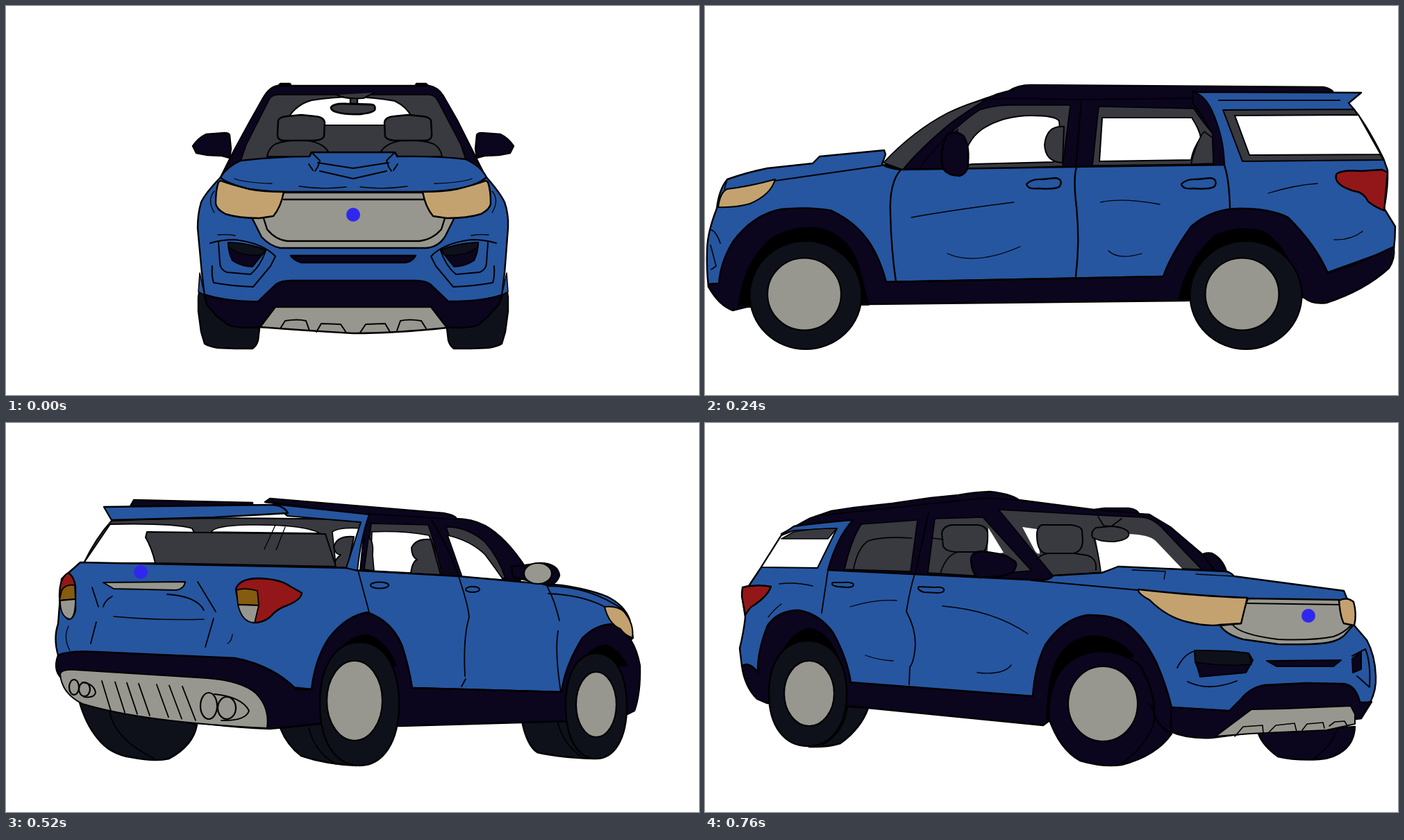
These frames come from a looping animation (998 px wide and 561 px high, 0.88 s). An HTML page with a canvas:

```html
<!DOCTYPE html>
<html lang="en">
<head>
<meta charset="utf-8">
<title>Turning car</title>
<style>
html, body { margin: 0; width: 100%; height: 100%; overflow: hidden; background: #fff; }
canvas { display: block; }
</style>
</head>
<body>
<canvas id="stage" width="998" height="561"></canvas>
<script>
const ctx = document.getElementById('stage').getContext('2d');
const BLUE = '#2656a0', DARK = '#0b051e', GLASS = '#393940', TYRE = '#0e1119',
  SILVER = '#98978f', TAN = '#c4a270', RED = '#931718', AMBER = '#855b10',
  BADGE = '#2f27ee', WHITE = '#fff', BLACK = '#000';

function paint(path, fill, width) {
  if (fill) { ctx.fillStyle = fill; ctx.fill(path); }
  if (width) { ctx.lineWidth = width; ctx.stroke(path); }
}
const shape = (fill, d, width = 2.4) => paint(new Path2D(d), fill, width);
const line = (d, width = 2.4) => shape(null, d, width);
const thin = d => line(d, 1.3);

function oval(fill, x, y, rx, ry, width = 2.2) {
  const path = new Path2D();
  path.ellipse(x, y, rx, ry, 0, 0, Math.PI * 2);
  paint(path, fill, width);
}
const badge = (x, y) => oval(BADGE, x, y, 10, 10, 0);

// An ellipse with slightly squared shoulders.
function tyre(x, y, rx, ry) {
  const k = 0.61, path = new Path2D();
  path.moveTo(x + rx, y);
  for (const [a, b] of [[1, 0], [0, 1], [-1, 0], [0, -1]]) {
    path.bezierCurveTo(x + rx * (a - b * k), y + ry * (b + a * k),
      x + rx * (a * k - b), y + ry * (b * k + a), x - rx * b, y + ry * a);
  }
  paint(path, TYRE, 2.4);
}

// Draws mirrored: x becomes sum - x.
function flip(sum, draw) {
  ctx.save();
  ctx.translate(sum, 0);
  ctx.scale(-1, 1);
  draw();
  ctx.restore();
}
function both(sum, draw) { draw(); flip(sum, draw); }

function front() {
  both(1000, () => {
    shape(TYRE, 'M280 400L277 420 277 440 281 470 286 487Q292 491 305 493L330 494 355 494Q361 490 363 482L365 465 330 440Z');
    shape(DARK, 'M322 186Q321 183 315 183L288 185Q277 190 269 202L274 212 290 215 311 216 322 219 324 206Z');
    shape(DARK, 'M390 117L395 112 409 112 412 117Z');
  });
  shape(DARK, 'M309 247L328 209 352 165 370 133Q380 116 392 115L609 115Q622 117 630 130L650 165 674 213 691 247Z');
  shape(GLASS, 'M338 223L346 200 378 137Q381 129 390 128L610 128Q618 129 622 137L655 200 662 221Z', 1.6);
  shape(WHITE, 'M406 162Q418 142 440 136Q500 126 560 137Q578 146 584 160L582 172 420 172Z', 2);
  both(1004, () => {
    shape(GLASS, 'M376 217Q378 205 388 199Q400 194 425 193Q455 195 464 210L466 218Z', 2);
    shape(GLASS, 'M392 165Q394 160 405 159L425 157 445 159Q458 160 459 168L458 188Q456 193 445 194L400 194Q390 194 391 183Z');
  });
  shape(GLASS, 'M476 128Q490 135 515 133L530 125', 2);
  shape(GLASS, 'M496 134V141H506V134');
  shape(GLASS, 'M468 146Q472 140 490 141L525 142Q533 142 531 150Q528 154 510 156Q490 157 476 153Q468 151 468 146Z', 2.8);
  shape(BLUE, 'M309 247Q318 232 338 223Q390 217 437 217L440 211 560 211 564 217Q620 216 662 221Q685 232 692 247Q712 270 718 283Q724 300 723 320L718 385 714 418Q670 428 637 427L363 427Q330 428 286 418L282 385 276 320Q276 300 281 283Q287 270 309 247Z');
  shape(BLUE, 'M279 385L277 412 286 417Z', 1.5);
  shape(BLUE, 'M721 385L723 412 714 417Z', 1.5);
  shape(DARK, 'M285 416Q320 427 363 426L388 402Q396 396 410 396L590 396Q604 396 612 402L637 426Q690 426 715 416L710 430 695 447 680 460Q665 466 634 463L366 463Q335 466 320 460L303 447 290 432Z');
  shape(SILVER, 'M388 434H612L635 464Q560 472 500 472Q430 468 366 463Z');
  shape(SILVER, 'M400 269L600 269 645 307 632 333Q622 348 605 349L395 349Q380 346 368 333L355 307Z');
  line('M400 279H603M371 306L376 322Q388 337 405 339L595 339Q614 337 627 322L632 306');
  badge(500, 301);
  shape(DARK, 'M410 360H590Q585 369 575 370L425 370Q414 366 410 360Z');
  line('M309 247Q315 255 350 264Q380 268 400 268H600Q670 267 692 247');
  line('M449 226L500 234 551 226M452 238L500 249 548 238', 2);
  both(1000, () => {
    line('M395 465L402 454Q420 451 432 454L437 468M447 470L454 458 482 459 490 471', 2);
    shape(TAN, 'M306 254Q302 265 302 285Q303 293 316 300Q335 306 365 306L385 303Q396 290 400 268Q370 268 350 264Q325 258 309 252Z');
    line('M437 217L440 211 452 223 449 232 445 238M436 228L442 237', 2);
    thin('M329 249Q345 255 383 256M422 260Q455 265 490 261M300 267Q289 280 300 298M305 330Q320 329 330 331');
    line('M294 342Q310 337 330 337Q370 342 388 361L381 375 356 405Q325 404 299 399Q296 390 297 375', 2);
    line('M306 341L308 370Q308 380 318 384L352 387Q366 376 374 353', 2);
    shape(DARK, 'M320 341Q320 355 326 367Q340 376 355 376L374 352Q350 342 320 341Z', 2);
    shape(TYRE, 'M320 341Q350 342 374 352L368 359Q340 362 321 348Z', 1.5);
  });
}

function frontCorner() {
  shape(DARK, 'M79 438Q80 460 95 472Q110 484 130 485Q165 487 190 481Q212 465 218 448Z');
  line('M104 440Q115 470 140 485', 1.6);
  shape(DARK, 'M264 214Q270 195 285 188Q295 186 303 192L296 212Z');
  shape(DARK, 'M280 214L298 190 345 150 375 132 390 131Q392 125 405 123L440 123 455 125 563 111Q575 102 605 99Q630 100 650 104L690 108 745 116 800 122 833 127 865 138 905 160Q880 170 840 215L525 227Z');
  line('M390 130L460 125 563 111L612 108 855 134', 1.6);
  shape(GLASS, 'M300 211L325 185 358 150Q372 137 385 136L430 134 592 125 514 220 440 215 420 207Z', 1.6);
  shape(WHITE, 'M328 210L366 170Q375 161 405 160L440 150 455 155Q447 190 445 215L420 207Z', 0);
  shape(WHITE, 'M537 153L558 150 540 184Q536 190 533 188Z', 0);
  line('M455 165Q448 190 445 214', 1.6);
  line('M452 212Q450 192 470 190L490 187M507 188Q530 186 537 197', 1.8);
  shape(GLASS, 'M472 155Q474 148 490 147L530 147Q538 150 537 165Q536 185 525 188L485 188Q472 186 471 170Z', 2);
  shape(GLASS, 'M415 138L430 149 441 148 449 135', 1.6);
  shape(GLASS, 'M405 158Q410 150 430 149L452 151Q460 156 457 165Q445 172 425 171Q402 168 405 158Z', 2);
  shape(GLASS, 'M545 213L615 136 684 138 694 216 630 220Z', 1.6);
  shape(WHITE, 'M585 187L607 151 608 186 600 189Z', 0);
  shape(GLASS, 'M608 158Q609 149 622 147L660 147Q673 149 674 160L672 178Q668 185 655 186L615 186Q607 182 608 158Z', 2);
  line('M650 186Q668 190 676 217M672 168L688 166M693 130L712 217', 1.6);
  shape(GLASS, 'M709 140L790 146Q805 170 814 211L719 214Z', 1.6);
  line('M717 166Q760 163 780 170Q795 180 801 210', 1.6);
  shape(BLUE, 'M95 242L253 221Q258 215 265 214L420 207 443 216 513 220Q518 226 530 227L838 212Q825 165 802 140Q835 142 887 149L905 162 934 208 952 235Q962 236 962 245L957 280Q959 300 965 325L962 350Q950 380 926 402L800 395 545 394 400 420 343 410 255 416 57 403Q48 385 49 365Q50 335 62 313L80 292Q82 265 91 252Z');
  shape(WHITE, 'M825 152L887 155 905 162 934 208 853 209Z', 2);
  shape(GLASS, 'M825 152Q860 152 887 157L905 167 838 167Z', 1.6);
  shape(DARK, 'M55 402Q68 404 72 402Q78 378 95 376L150 375 210 378Q230 382 243 398L260 415 343 410 380 404 345 445Q320 456 285 454L70 426Z');
  shape(DARK, 'M343 410Q350 380 365 345Q385 305 410 288Q430 276 465 277Q500 283 525 320Q540 350 543 394L805 374Q810 340 830 303Q850 275 880 270Q910 270 925 292Q940 330 939 360Q945 350 955 348L962 350Q958 380 940 398L926 404 800 409 528 436 520 430 345 448Z');
  shape(BLACK, 'M398 335Q420 308 455 307Q490 308 508 340Q522 365 523 428L500 430Z', 1);
  shape(DARK, 'M368 410Q372 375 390 348Q420 326 455 330Q490 335 508 365Q522 395 520 425Q505 470 475 487Q440 497 415 493Q365 480 343 448Q360 440 368 422Z');
  line('M376 405Q366 412 368 430Q378 465 415 491', 1.8);
  oval(SILVER, 442, 405, 50, 54);
  shape(BLACK, 'M820 345Q835 300 865 296Q895 300 912 350Z', 1);
  shape(TYRE, 'M780 411Q790 440 820 462Q840 468 865 467L880 440 820 408Z');
  tyre(867, 390, 56, 76);
  oval(SILVER, 865, 390, 36, 47);
  line('M810 408Q812 445 848 466', 1.6);
  shape(SILVER, 'M79 420L85 408 180 412 228 413 280 452 230 448 120 443 79 434Z', 2);
  line('M90 437L94 430 108 431 116 437M123 440L125 432 148 434 155 443M163 445L166 433 193 436 204 447M211 448L212 436 240 438 252 452', 1.6);
  shape(SILVER, 'M102 255L233 253Q240 270 243 289L273 292Q265 305 240 312L190 319Q140 320 120 317Q105 315 95 307L82 292 95 288Z');
  line('M102 262L235 260M85 292Q95 303 110 308Q140 314 190 312Q245 305 255 291', 2);
  badge(146, 278);
  shape(TAN, 'M234 252Q300 250 391 240Q392 246 375 255Q350 280 320 287Q290 294 273 291L243 289Z');
  shape(TAN, 'M81 258Q90 250 102 256Q100 280 95 289L80 292Q76 275 81 258Z');
  line('M391 241L545 227', 1.8);
  shape(DARK, 'M99 342L206 343 192 351 110 351Z', 2);
  line('M83 336L64 326Q56 345 58 381L76 365', 2);
  shape(DARK, 'M70 330L83 340 82 360 70 355Z', 2);
  shape(DARK, 'M226 342L232 332 260 329 310 328 309 345Q306 350 302 366L236 360Z', 2);
  shape(TYRE, 'M228 348L232 332 260 329 310 328 308 345Q280 350 245 349Z', 1.4);
  line('M310 329Q325 333 335 353M249 372Q290 388 320 373', 1.8);
  shape(RED, 'M920 236Q940 232 961 237L962 250 957 277Q950 265 945 263Q925 250 920 236Z');
  shape(DARK, 'M568 200Q565 205 570 213Q575 220 600 222L620 223Q632 218 632 195Q630 186 618 185Q590 188 580 192Z');
  line('M713 218Q720 240 725 272Q712 295 712 320Q714 345 720 352L721 377M838 213L847 274', 1.8);
  line('M671 240Q672 236 685 237L707 236Q711 240 700 244L680 245Q670 245 671 240ZM801 233Q803 229 815 230L831 230Q835 234 824 236L810 237Q801 237 801 233Z', 2);
  thin('M550 304Q600 270 673 264M574 349Q585 364 623 360M739 256Q770 254 806 265M744 343Q765 342 784 335M860 235Q885 229 908 232M905 261Q916 269 924 280M253 221L308 218M352 215L354 225M352 214L400 212');
}

function sideWheel(x, hubX) {
  oval(TYRE, x, 417, 80.5, 78);
  oval(SILVER, hubX, 415.5, 53, 52);
}

function side() {
  shape(DARK, 'M258 230L330 172Q370 145 405 133L437 123Q450 114 470 114L890 117Q905 120 905 126L735 126 748 229 280 236Z');
  line('M400 137Q420 124 445 121M406 134Q440 132 540 135L702 133', 1.6);
  shape(GLASS, 'M257 226Q300 180 350 154Q385 138 406 134Q380 150 355 168Q310 205 285 236Z', 1.8);
  shape(GLASS, 'M309 234Q350 180 395 150Q420 142 445 143L526 143 515 231 390 236Z', 1.6);
  shape(WHITE, 'M372 230Q374 195 400 177Q430 158 470 158Q505 158 510 166Q512 180 505 190L502 225 385 228Z', 1.8);
  shape(DARK, 'M309 234Q335 200 365 176L358 235Z', 0);
  shape(GLASS, 'M517 174Q492 172 489 200Q490 225 515 226Z', 2);
  shape(GLASS, 'M567 145L704 148Q715 165 732 185L731 228 558 230Z', 1.6);
  shape(WHITE, 'M572 161L701 161Q712 178 714 190Q703 205 700 222L568 224Z', 2);
  shape(GLASS, 'M719 181Q709 192 700 228L732 227 731 190Z', 1.6);
  line('M542 135L534 232', 1.8);
  shape(BLUE, 'M32 250Q60 240 90 234L155 227 165 217 258 208 260 214 255 228Q262 234 282 236L530 232 748 229Q740 170 702 124L945 125 927 140Q950 165 977 220L983 237Q984 260 978 292L994 318Q994 335 992 350L895 385 660 390 261 398 20 410 5 405Q2 380 3 350Q4 325 17 292Q20 265 32 250Z');
  shape(DARK, 'M702 124Q718 126 730 150Q748 190 748 229L732 229 731 185Q715 155 702 140Z', 1.5);
  shape(GLASS, 'M746 150L935 149 977 222 774 224Z', 2);
  shape(WHITE, 'M763 158L941 157 973 214 784 215Z', 2);
  line('M740 136H914', 2);
  shape(DARK, 'M5 401L20 400Q22 370 40 340Q70 300 110 293Q150 289 182 295Q225 315 245 355Q255 375 261 398L660 390Q670 360 700 318Q730 292 770 292Q815 292 840 305Q880 345 897 385Q950 368 992 347Q994 365 985 378Q950 410 895 428Q875 431 862 420L690 425 237 430 60 434 40 439Q20 432 5 405Z');
  shape(BLACK, 'M48 432Q55 370 95 335Q130 315 165 320Q205 330 220 370L236 431Z', 1);
  shape(BLACK, 'M682 424Q690 370 735 330Q770 315 805 325Q840 345 862 420Z', 1);
  sideWheel(145, 143);
  sideWheel(779, 773.5);
  line('M101 252Q200 238 255 230', 1.8);
  shape(TAN, 'M32 264Q65 260 101 250Q95 272 65 285Q45 291 19 290Q22 268 32 264Z', 2);
  line('M32 250L28 264M9 323Q16 325 22 342M8 345Q12 360 16 375L9 380', 1.6);
  shape(DARK, 'M348 186Q360 178 372 187Q381 200 379 225Q380 240 367 245Q350 245 343 235Q337 210 348 186Z');
  line('M282 236Q265 255 267 300Q268 350 275 398M535 232Q530 250 535 290Q540 340 534 390M748 230Q755 250 756 292');
  const handle = 'M463 257Q470 249 485 250L505 248Q516 250 511 260Q505 265 480 263Q465 265 463 257Z';
  line(handle);
  ctx.save();
  ctx.translate(223, 0);
  line(handle);
  ctx.restore();
  thin('M297 305Q350 295 445 283M349 357Q390 375 454 347M570 283Q600 276 655 286M581 353Q595 367 629 357M811 270Q850 258 882 256M906 337Q930 338 947 325');
  shape(RED, 'M909 243Q915 236 945 238L975 236 983 240 978 295Q965 290 955 282Q948 268 935 267Q905 258 909 243Z');
}

function rear() {
  both(1014, () => {
    shape(TYRE, 'M283 368Q279 390 283 430L292 480Q300 490 320 493L345 490Q354 488 355 478L362 440 330 400Z');
    shape(DARK, 'M322 182Q305 182 303 195Q303 207 312 210L325 210Z');
    shape(DARK, 'M365 110Q372 98 385 99L392 106Z');
  });
  shape(GLASS, 'M345 130L316 205 340 212 672 212 697 205 668 130Z');
  shape(WHITE, 'M390 137L616 135 631 170 384 170Z', 2);
  both(1012, () => shape(GLASS, 'M402 168Q405 155 420 155L440 155Q450 158 451 166Z'));
  shape(GLASS, 'M342 210Q345 185 365 175Q430 164 505 164Q600 164 640 173Q665 185 667 210Z', 2);
  oval(GLASS, 511, 135, 18, 5);
  both(1014, () => line('M363 133L332 209', 2));
  shape(BLUE, 'M297 232Q303 213 312 206L332 210H680L700 206Q712 213 716 232L728 270Q736 300 736 320Q734 350 724 372L290 372Q277 340 278 310Q280 285 286 270Z');
  shape(BLUE, 'M345 131Q352 115 368 108L395 102 500 99Q600 99 625 103Q655 108 668 131L650 129 365 129Z');
  shape(DARK, 'M290 372Q310 360 345 364Q500 368 660 365Q690 359 724 371Q720 398 695 427L318 427Q298 407 290 372Z');
  shape(SILVER, 'M318 420Q325 408 350 404Q500 404 660 404Q690 408 694 424Q690 435 640 442Q570 448 505 448Q420 448 370 440Q320 432 318 420Z');
  for (const x of [447, 463, 485, 497, 516, 529, 550, 566]) line(`M${x} 422V446`, 2);
  shape(SILVER, 'M400 258L406 242Q408 238 414 238L600 238Q608 240 613 258Z');
  badge(512, 223);
  both(1014, () => {
    oval(null, 354, 421, 15, 11);
    oval(null, 388, 424, 17, 14);
    line('M365 113L360 129', 1.6);
    shape(RED, 'M286 262Q290 238 310 231Q330 229 339 237L338 285 323 306Q288 295 286 262Z');
    shape(AMBER, 'M315 249L339 248 339 268 313 270Z', 2);
    shape(SILVER, 'M313 270L338 268Q337 285 330 292L324 303Q312 288 313 270Z', 2);
    line('M361 247Q355 256 355 267M400 268Q385 285 377 303M384 317Q386 332 394 334M325 318Q330 335 339 340', 1.6);
  });
}

function rearCorner() {
  shape(TYRE, 'M105 400Q115 435 132 455Q150 478 180 482Q215 489 235 484Q270 465 275 435L120 400Z');
  line('M149 415Q155 455 215 485', 1.8);
  shape(TYRE, 'M395 440Q405 465 425 480Q460 492 505 494L480 430Z');
  shape(TYRE, 'M743 430Q750 465 765 475Q800 483 848 484L830 430Z');
  shape(DARK, 'M179 120L184 111 355 115 355 121Z');
  shape(DARK, 'M373 114L380 109 630 130Q650 134 648 138Q670 138 690 148Q720 165 748 208L740 228 510 214 518 132Z');
  line('M520 131L648 139', 1.6);
  shape(GLASS, 'M152 141Q130 165 112 202L490 209 518 140Q300 134 152 141Z', 2);
  shape(WHITE, 'M150 146Q240 144 268 152L272 160 205 162 216 202 112 202Z', 1.8);
  shape(WHITE, 'M296 157Q300 148 350 147Q430 146 452 159Z', 1.6);
  shape(WHITE, 'M470 157Q480 150 512 152L497 209 475 205Z', 1.6);
  shape(GLASS, 'M501 164Q475 162 472 180Q475 190 482 190Q470 200 475 208L492 209Z', 2);
  shape(GLASS, 'M203 157L460 160 475 207 215 202Q210 180 201 165Z', 2);
  thin('M388 147L372 182M402 150L389 183');
  shape(GLASS, 'M516 211Q522 180 526 145L608 147Q618 175 628 219Z', 1.6);
  shape(WHITE, 'M525 213L527 157Q570 155 609 162L617 180 622 218Z', 1.6);
  shape(GLASS, 'M612 168Q590 166 584 180Q584 193 592 197Q585 200 583 217L626 219Z', 2);
  shape(GLASS, 'M516 211L522 165Q530 170 528 190L530 213Z', 1.6);
  shape(GLASS, 'M634 150Q665 150 690 172Q710 195 719 224L657 221Z', 1.6);
  shape(WHITE, 'M636 162Q670 170 690 190Q705 210 716 226L657 222Z', 1.6);
  line('M613 140Q635 175 652 221', 1.6);
  shape(BLUE, 'M107 201L490 209 510 213 652 221 740 229 800 234Q840 240 865 250Q890 262 898 283L903 310 800 388 585 382 440 384 400 380 75 335Q68 310 75 290L80 225Z');
  shape(BLUE, 'M385 117L523 132Q511 165 506 213L490 209 511 143 405 134Z', 2);
  shape(BLUE, 'M141 121L380 118Q400 118 406 130L300 136 152 140Z');
  shape(DARK, 'M75 335Q90 328 130 330L330 339Q385 350 418 384L440 384Q445 340 465 310Q490 278 520 273Q555 285 570 320Q580 350 585 382L800 388Q805 350 830 310Q850 290 875 290Q905 305 913 350Q914 390 905 415L895 420 810 430 568 437 450 434 380 441Q200 435 85 372Q66 360 75 335Z');
  shape(BLACK, 'M470 345Q485 308 520 305Q550 315 562 350Z', 1);
  shape(BLACK, 'M825 350Q840 322 865 320Q885 328 895 350Z', 1);
  tyre(509, 405, 57, 89);
  oval(SILVER, 502, 400.5, 40, 57.5);
  line('M436 440Q445 475 475 492', 1.8);
  tyre(850, 408, 44, 76);
  oval(SILVER, 850, 406, 29, 47);
  line('M794 430Q803 465 830 482', 1.8);
  shape(SILVER, 'M78 362Q80 355 100 356L290 368Q340 372 360 390Q380 410 376 440Q200 432 110 405Q80 390 78 362Z', 2);
  [138, 157, 174, 191, 217, 235, 254].forEach((x, i) => line(`M${x} ${372 + i * 1.3}l${13 + i} ${43 + i}`, 1.8));
  oval(null, 98, 381, 7, 11);
  oval(null, 113, 384, 8, 10);
  line('M110 374Q127 376 129 389Q127 397 112 395', 2);
  oval(null, 292, 408, 12, 19);
  oval(null, 318, 411, 13, 16);
  line('M300 391Q340 395 350 415Q345 430 310 429', 2);
  badge(194, 215);
  shape(SILVER, 'M140 230L258 229Q257 239 245 241L155 239Z', 2);
  shape(RED, 'M77 250Q77 222 90 216Q98 222 100 235L100 270Q97 283 90 283Q78 275 77 250Z');
  shape(AMBER, 'M80 242Q85 232 99 234L100 254 77 256Z', 1.8);
  shape(SILVER, 'M78 256L100 254Q100 280 92 283Q78 280 78 256Z', 1.8);
  shape(RED, 'M331 240Q335 224 365 224Q395 225 410 236L426 245Q425 255 405 263Q390 268 380 280Q370 288 358 288Q335 275 331 240Z');
  shape(AMBER, 'M332 241Q345 237 362 242L364 263 334 262Z', 1.8);
  shape(SILVER, 'M334 262L364 263Q360 280 358 288Q340 288 334 262Z', 1.8);
  line('M276 229L302 272M299 282L287 323M124 237L133 265M130 287L122 318M153 250Q142 256 140 265M232 247Q275 250 285 270', 1.8);
  thin('M155 279Q220 285 285 283M90 293Q82 310 92 328M326 305Q325 315 319 318');
  line('M507 213L523 273M652 222Q665 260 667 280Q658 310 661 365M662 369L656 380M795 300Q790 330 799 388M779 235Q790 255 797 285M781 246Q830 248 862 265M779 235Q840 235 890 270', 1.8);
  oval(null, 538, 234, 13, 4.5, 2);
  oval(null, 672, 240, 10, 4, 2);
  shape(DARK, 'M728 207L748 205 770 202Q795 203 797 220Q793 233 780 234L730 222Z');
  oval(SILVER, 766, 217, 20, 15);
  shape(TAN, 'M862 265Q880 263 890 272Q905 290 902 310Q890 305 885 297Q868 290 862 265Z', 2);
}

const LOOP = 880;
const timeline = [
  [120, front],
  [240, frontCorner],
  [320, side],
  [400, () => flip(983, rearCorner)],
  [520, rear],
  [640, rearCorner],
  [760, () => flip(997, side)],
  [LOOP, () => flip(1015, frontCorner)]
];

ctx.lineJoin = ctx.lineCap = 'round';
ctx.strokeStyle = BLACK;
let start;

function frame(now) {
  start ??= now;
  const t = (now - start) % LOOP;
  ctx.fillStyle = WHITE;
  ctx.fillRect(0, 0, 998, 561);
  timeline.find(([end]) => t < end)[1]();
  requestAnimationFrame(frame);
}
requestAnimationFrame(frame);
</script>
</body>
</html>
```
